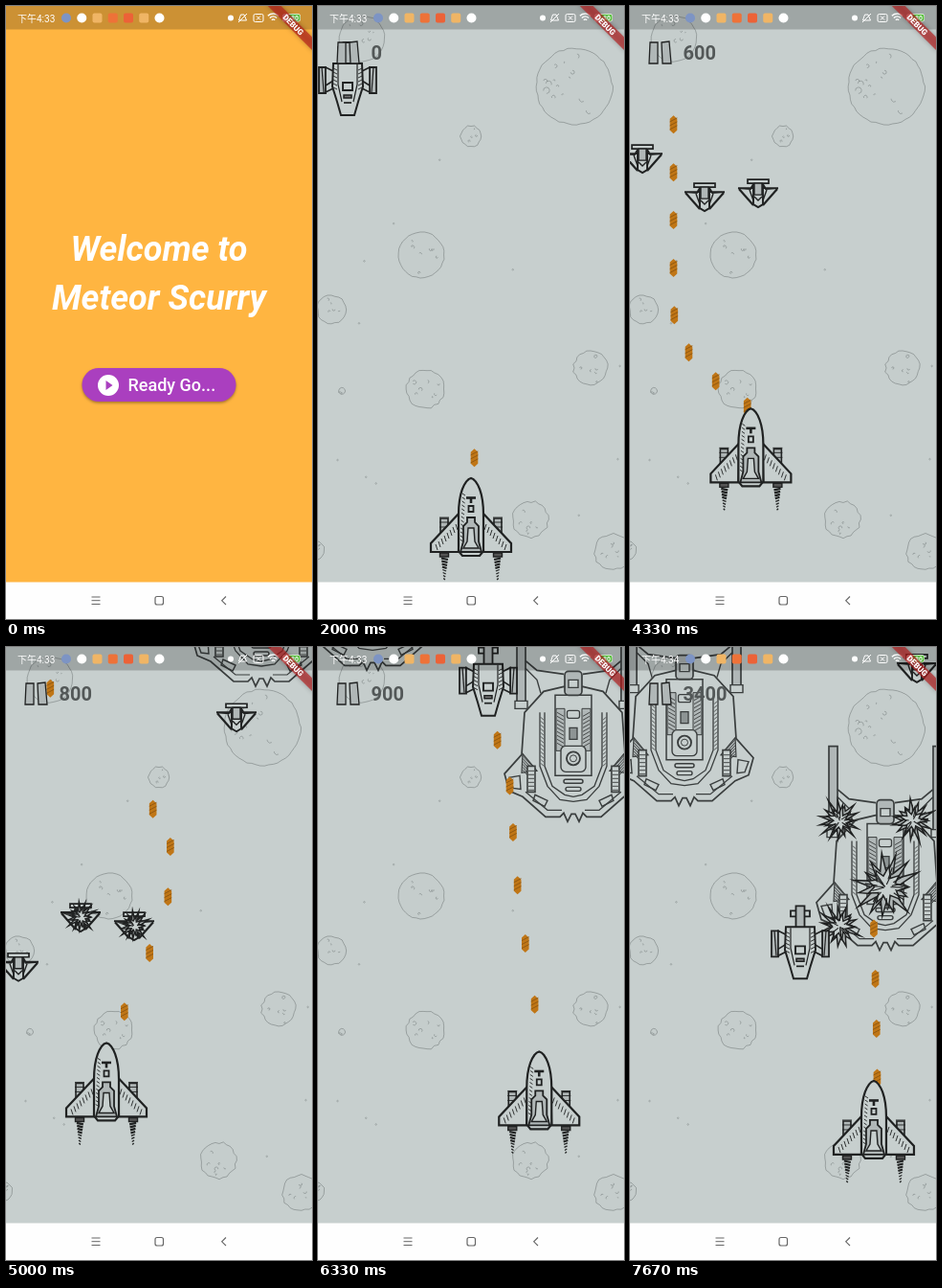
These frames come from a looping animation (320x640 px, 8000 ms). An HTML page with a canvas:

```html
<!DOCTYPE html>
<html lang="en">
<head>
<meta charset="utf-8">
<title>Meteor Scurry</title>
<style>
  html, body { margin: 0; width: 100%; height: 100%; overflow: hidden; background: #fff; }
  canvas { display: block; }
</style>
</head>
<body>
<canvas id="stage" width="320" height="640"></canvas>
<script>
const c = document.getElementById('stage').getContext('2d');
const PAPER = '#c7cfce', SHADE = '#b0b7b7', INK = '#202222', SOFT_INK = '#3a3e3e';
const LOOP = 8000, STEP = 1000 / 3, GAME_START = 2, BULLET_SPEED = 419;

// ---------- helpers ----------
function seeded(seed) {
  return () => (seed = (seed * 16807) % 2147483647) / 2147483647;
}
const linear = f => f;
const smooth = f => f * f * (3 - 2 * f);
// Eases between rows of [key, value, value, ...].
function at(rows, key, ease) {
  const i = Math.max(1, Math.min(rows.length - 1, rows.findIndex(row => row[0] >= key)));
  const [from, ...a] = rows[i - 1], [to, ...b] = rows[i];
  const f = ease(Math.max(0, Math.min(1, (key - from) / (to - from))));
  return a.map((v, j) => v + (b[j] - v) * f);
}
let ink = INK;
function paint(fill, width = 1.3, stroke = ink) {
  if (fill) { c.fillStyle = fill; c.fill(); }
  if (width) { c.lineWidth = width; c.strokeStyle = stroke; c.stroke(); }
}
function path(points, closed = true) {
  c.beginPath();
  points.forEach(([x, y]) => c.lineTo(x, y));
  if (closed) c.closePath();
}
function poly(points, fill = PAPER, width) { path(points); paint(fill, width); }
function line(points, width, color) { path(points, false); paint(null, width, color); }
function symmetric(points, fill, width) {
  poly([...points, ...points.map(([x, y]) => [-x, y]).reverse()], fill, width);
}
function box(x, y, w, h, fill = PAPER, width = 1.2, r = 0, stroke) {
  c.beginPath(); c.roundRect(x, y, w, h, r); paint(fill, width, stroke);
}
// A box centred on the sprite's axis.
function block(y, w, h, fill, width, r) { box(-w / 2, y, w, h, fill, width, r); }
function disc(x, y, r, fill = PAPER, width = 1.2, stroke) {
  c.beginPath(); c.arc(x, y, r, 0, 7); paint(fill, width, stroke);
}
function placed(x, y, draw, mirror = 1) {
  c.save(); c.translate(x, y); c.scale(mirror, 1); draw(); c.restore();
}
function both(draw) { placed(0, 0, draw); placed(0, 0, draw, -1); }
// A column of short slanted strokes.
function hatch(x, y, count, dx, dy, gap = 4, drift = 0) {
  for (let i = 0; i < count; i++) {
    const px = x + i * drift, py = y + i * gap;
    line([[px, py], [px + dx, py + dy]], .9);
  }
}
function ring(x, y, n, radius) {
  return Array.from({ length: n }, (_, i) => {
    const a = i / n * 2 * Math.PI, r = radius(i);
    return [x + Math.cos(a) * r, y + Math.sin(a) * r];
  });
}
function text(str, x, y, font, color, align = 'left') {
  c.font = font; c.fillStyle = color; c.textAlign = align; c.fillText(str, x, y);
}

// ---------- background ----------
const CRATERS = [[46, 34, 24], [268, 84, 40], [160, 136, 11], [108, 260, 24], [14, 317, 15],
  [112, 400, 20], [285, 378, 18], [222, 536, 19], [308, 570, 19], [-3, 568, 10], [25, 402, 3.5]];
function drawSpace() {
  const rnd = seeded(77), gray = 'rgba(95,103,103,.5)';
  c.fillStyle = PAPER; c.fillRect(0, 0, 320, 640);
  for (const [x, y, r] of CRATERS) {
    const bump = r > 22 ? .04 : .13;
    poly(ring(x, y, Math.ceil(r * 1.2) + 6, () => r * (1 + bump * (rnd() - .6))), '#c5cdcc', 0);
    paint(null, .9, gray);
    for (let i = 0; i < r / 3; i++) {
      const a = rnd() * 7, d = Math.sqrt(rnd()) * r * .8;
      c.beginPath();
      c.arc(x + Math.cos(a) * d, y + Math.sin(a) * d, .6 + r * .07 * rnd(), a, a + 2 + rnd() * 3);
      paint(null, .8, gray);
    }
  }
  for (let i = 0; i < 12; i++) disc(rnd() * 320, 120 + rnd() * 470, .8, null, .6, gray);
}

// ---------- sprites ----------
function drawPlayer() {
  both(() => {
    box(24, 42, 8, 24, SHADE, 1.6);
    hatch(23, 41, 3, 10, 0, 5);
    poly([[12, 36], [42, 68], [42, 77], [13, 77]], PAPER, 2.2);
    hatch(16, 48, 8, -2, 6, 3, 3);
    box(23.5, 78, 9, 4, '#555', 1.4);
    for (let y = 85; y < 108; y += 3) {
      const w = (112 - y) / 7;
      line([[28 - w, y], [28 + w * .8, y - 1.5]], y < 95 ? 2.2 : 1.3);
    }
  });
  // The nose widens along a rounded curve.
  const nose = Array.from({ length: 9 }, (_, i) => [-13 * Math.sin(i / 8 * Math.PI / 2), 38 * (i / 8) ** 1.7]);
  symmetric([...nose, [-13, 76], [-9, 81]], PAPER, 2.2);
  hatch(-9, 16, 13, 3, 2, 4, -.2);
  line([[-5, 20.5], [5, 20.5]], 2.6);
  line([[0, 20], [0, 26]], 2.6);
  block(29, 5, 6, PAPER, 1.8);
  symmetric([[-4, 41], [-4, 46], [-8, 50], [-8, 66], [-11, 77]], SHADE, 1.8);
  symmetric([[-3, 52], [-4, 66], [-8, 73]], PAPER, 1.4);
}
function drawSmall() {
  symmetric([[-21, -5], [-8, -4], [-5, -9], [-5, 12], [0, 15]], PAPER, 1.9);
  block(-14, 22, 4, PAPER, 1.7);
  both(() => {
    line([[20, -4], [5, 13]], 2.2);
    line([[9, -3], [5, 8]], 1.4);
  });
  block(-10, 8, 12, SHADE, 1.4);
  line([[-4, 4], [0, 8], [4, 4]], 1.4);
}
function drawMid() {
  both(() => {
    box(23, -12, 7, 27, SHADE, 1.8);
    line([[27, -12], [25, 14]], 1.2);
    poly([[15, -8], [23, -12], [23, 14], [13, 9]], PAPER, 1.6);
    line([[15, 2], [23, 7]], 1.6);
  });
  block(-33, 20, 6, PAPER, 1.8);
  block(-38, 9, 26, SHADE, 1.8);
  symmetric([[-6, -16], [-15, -16], [-16, 8], [-11, 24], [-7, 38]], PAPER, 2);
  both(() => {
    line([[10, -15], [10, 6], [6, 24]], 1.2);
    hatch(15, -11, 6, -4, 2);
  });
  block(4, 10, 8, PAPER, 1.9);
  block(17, 8, 3, '#777', 1.5);
  line([[-4, 25], [4, 25]], 1.7);
}
function drawBig() {
  ink = SOFT_INK;
  both(() => {
    box(50, -147, 9, 94, SHADE, 1.7);
    box(48, -60, 13, 8, PAPER, 1.4);
    line([[50, -102], [38, -92], [10, -88]], 1.7);
    line([[50, -94], [38, -82], [34, -68]], 1.4);
  });
  symmetric([[-10, -75], [-31, -70], [-51, -48], [-54, -4], [-72, 16], [-67, 34], [-53, 40],
    [-29, 61], [-14, 61], [-10, 57], [-6, 66], [-2, 58]], PAPER, 1.7);
  both(() => {
    for (const inset of [0, 5]) {
      line([[35 - inset, -48], [35 - inset, 8], [27 - inset, 29], [14 - inset, 43 - inset], [0, 45 - inset]], 1.3);
    }
    hatch(34, -43, 13, -3, 3);
    poly([[53, -5], [38, 13], [54, 15]], SHADE, 1.2);
    hatch(53, -3, 6, -9, 10, 3);
    box(40, 8, 8, 27, PAPER, 1.6);
    hatch(41, 13, 6, 6, 0);
    poly([[56, 18], [67, 20], [63, 31], [55, 32]], PAPER, 1.4);
    poly([[27, 44], [40, 38], [42, 44], [30, 50]], PAPER, 1.4);
    line([[50, 35], [27, 54], [12, 54]], 1.2);
  });
  block(-66, 38, 84, PAPER, 1.5);
  both(() => { box(9, -52, 9, 44, SHADE, 1); hatch(10, -44, 9, 7, -4); });
  block(-91, 18, 25, SHADE, 1.7, 4);
  block(-82, 10, 8, PAPER, 1.4);
  block(-50, 13, 8, PAPER, 1.3, 2);
  block(-32, 8, 12, '#8d9494', 1.3);
  block(-13, 26, 27, PAPER, 1.4, 5);
  disc(0, 0, 7, PAPER, 1.9);
  disc(0, 0, 3.5, null, 1);
  block(22, 20, 4, PAPER, 1.5, 2);
  block(30, 16, 4, PAPER, 1.4, 2);
  ink = INK;
}
function drawBullet() {
  symmetric([[0, -9.5], [-3.8, -6], [-3.8, 6], [0, 9.5]], '#c07616', 0);
  for (let y = -4; y <= 6; y += 4) line([[-3.8, y + 1], [3.8, y - 3]], .9, '#8c5510');
}
function drawBurst(x, y, r) {
  const rnd = seeded(Math.round(5000 + x * 31 + y * 7));
  const spikes = i => r * (i % 2 ? .4 + rnd() * .15 : .75 + rnd() * .4);
  poly(ring(x, y, 30, spikes), SHADE, 1.5);
  poly(ring(x, y, 18, i => spikes(i) * .7), PAPER, 1.5);
  for (let i = 0; i < r / 2; i++) {
    const a = rnd() * 7, near = r * rnd() * .4;
    line([near, near + r * .4].map(d => [x + Math.cos(a) * d, y + Math.sin(a) * d]), 1.1);
  }
}
// One burst in the middle; larger craft also break up at three corners.
function drawBursts({ half }) {
  const r = 6 + half * .4;
  drawBurst(0, 0, r);
  if (half > 25) {
    for (const [sx, sy] of [[-1, -1], [.6, -1], [-1, .6]]) drawBurst(sx * half * .72, sy * half * 1.05, r * .65);
  }
}

// ---------- game ----------
const KINDS = {
  small: { draw: drawSmall, speed: 262, points: 100, reach: 15, half: 21 },
  mid: { draw: drawMid, speed: 206, points: 600, reach: 38, half: 30 },
  big: { draw: drawBig, speed: 106, points: 2500, reach: 48, half: 66 }
};
// x, y at a known second, and the second of destruction.
const enemy = (kind, x, y, when, death = Infinity) => ({ ...KINDS[kind], x, y, when, death });
const ENEMIES = [
  enemy('mid', 31, 76, 2, 3.6),
  enemy('small', 13, 159, 4.333),
  enemy('small', 78, 199, 4.333, 4.65),
  enemy('small', 134, 195, 4.333, 4.7),
  enemy('small', 241, 248, 5.667, 5.95),
  enemy('big', 267, 187, 7, 7.6),
  enemy('big', 57, 29, 7),
  enemy('mid', 178, 171, 7),
  enemy('small', 300, 22, 7.667)
];
const enemyY = (e, t) => e.y + e.speed * (Math.min(t, e.death) - e.when);

// Second, x and y of the nose where the pilot changes course.
const COURSE = [
  [2.53, 160, 493], [3, 57, 501], [3.45, 42, 478], [3.92, 42, 479], [4.6, 170, 390], [5.19, 84, 421],
  [5.5, 170, 372], [5.85, 200, 372], [6.6, 244, 443], [7.7, 255, 453]
];
// Shot number against the second it is fired.
const SHOTS = [[0, 1.94], [20, 4.307], [31, 5.668], [42, 6.921], [48, 7.65]];

function drawBullets(t) {
  for (let shot = 0; shot <= 48; shot++) {
    const [fired] = at(SHOTS, shot, linear);
    if (fired > t) break;
    const [noseX, noseY] = at(COURSE, fired, smooth);
    const x = noseX + 3.5, startY = noseY + 4, y = startY - BULLET_SPEED * (t - fired);
    const absorbed = ENEMIES.some(e => {
      const gap = startY - e.reach - enemyY(e, fired);
      const hit = fired + gap / (BULLET_SPEED + e.speed);
      return gap > 0 && Math.abs(x - e.x) < e.half && hit <= t && hit < e.death - .05;
    });
    if (y > 6 && !absorbed) placed(x, y, drawBullet);
  }
}
function drawGame(t) {
  drawSpace();
  for (const e of ENEMIES) {
    const y = enemyY(e, t), sinceDeath = t - e.death;
    if (sinceDeath > .35) continue;
    placed(e.x, y, () => {
      e.draw();
      if (sinceDeath >= 0) drawBursts(e);
    });
  }
  drawBullets(t);
  placed(...at(COURSE, t, smooth), drawPlayer);
  poly([[21, 38], [29, 38], [29, 60], [20, 60]], SHADE, 1.3);
  poly([[33, 38], [41, 37], [43, 60], [34, 60]], SHADE, 1.3);
  const score = ENEMIES.reduce((sum, e) => sum + (t >= e.death ? e.points : 0), 0);
  text(score, 55.5, 55.5, '700 20px Roboto, sans-serif', '#535858');
}

// ---------- screens and system bars ----------
function drawWelcome() {
  c.fillStyle = '#ffb541'; c.fillRect(0, 0, 320, 640);
  const title = 'italic 700 36px Roboto, sans-serif';
  text('Welcome to', 160, 266, title, '#fff', 'center');
  text('Meteor Scurry', 160, 317, title, '#fff', 'center');
  c.save();
  c.shadowColor = 'rgba(0,0,0,.35)'; c.shadowBlur = 3; c.shadowOffsetY = 1.5;
  box(79.5, 378, 161, 35, '#aa3fbf', 0, 17.5);
  c.restore();
  disc(107, 396, 11, '#fff', 0);
  poly([[104.5, 391], [104.5, 401], [111.5, 396]], '#aa3fbf', 0);
  text('Ready Go...', 127.5, 402, '500 18px Roboto, sans-serif', '#fff');
}
function drawStatusBar(clock) {
  const white = '#fff';
  c.fillStyle = 'rgba(0,0,0,.2)'; c.fillRect(0, 0, 320, 24.5);
  text(clock, 12, 16.5, '10px Roboto, "Noto Sans CJK SC", "Noto Sans CJK", sans-serif', white);
  ['#7d94c4', white, '#f0b565', '#ee7238', '#ec6237', '#f0b565', white].forEach((color, i) => {
    const x = 63 + i * 16.25, isSquare = i > 1 && i < 6;
    box(x - 5, 7.5, 10, 10, color, 0, isSquare ? 2 : 5);
  });
  disc(235, 12.5, 3, white, 0);
  path([[243.5, 15], [245.5, 9], [249, 9], [251.5, 15]]); paint(null, 1, white);
  line([[243, 17], [252, 8]], 1, white);
  box(259, 8.5, 10, 8, null, 1, 1.5, white);
  for (const s of [-2, 2]) line([[264 - s, 10.5], [264 + s, 14.5]], 1, white);
  for (const r of [2.5, 5.5, 8.5]) {
    c.beginPath(); c.arc(279.5, 16.5, r, -2.3, -.84); paint(null, 1.4, white);
  }
  box(289, 8, 19, 8.5, white, 0, 3);
  box(295, 8.7, 12.5, 7, '#54bd39', 0, 2);
  text('80', 298, 15, '700 7px Roboto, sans-serif', white);
}
function drawDebugBanner() {
  c.save();
  c.translate(320, 0); c.rotate(Math.PI / 4);
  c.shadowColor = 'rgba(0,0,0,.4)'; c.shadowBlur = 5;
  box(-34, 22.8, 68, 9.8, 'rgba(183,28,28,.66)', 0);
  c.shadowBlur = 0;
  text('DEBUG', 0, 30.7, '900 8.3px Roboto, sans-serif', '#fff', 'center');
  c.restore();
}
function drawNavBar() {
  const gray = '#666';
  c.fillStyle = '#fefefe'; c.fillRect(0, 601.5, 320, 38.5);
  for (const y of [617, 620.7, 624.5]) line([[89.5, y], [98.5, y]], 1, gray);
  box(156, 616.5, 8.5, 8.5, null, 1.2, 2, gray);
  line([[230, 616.5], [225.7, 620.8], [230, 625]], 1.1, gray);
}

function frame(now) {
  const ms = now % LOOP;
  let tick = Math.round(ms / STEP);
  if (Math.round(tick * STEP / 10) * 10 > ms) tick--;
  const t = tick / 3;
  if (t < GAME_START) drawWelcome(); else drawGame(t);
  drawStatusBar(t < 7 ? '下午4:33' : '下午4:34');
  drawDebugBanner();
  drawNavBar();
  requestAnimationFrame(frame);
}
requestAnimationFrame(frame);
</script>
</body>
</html>
```
